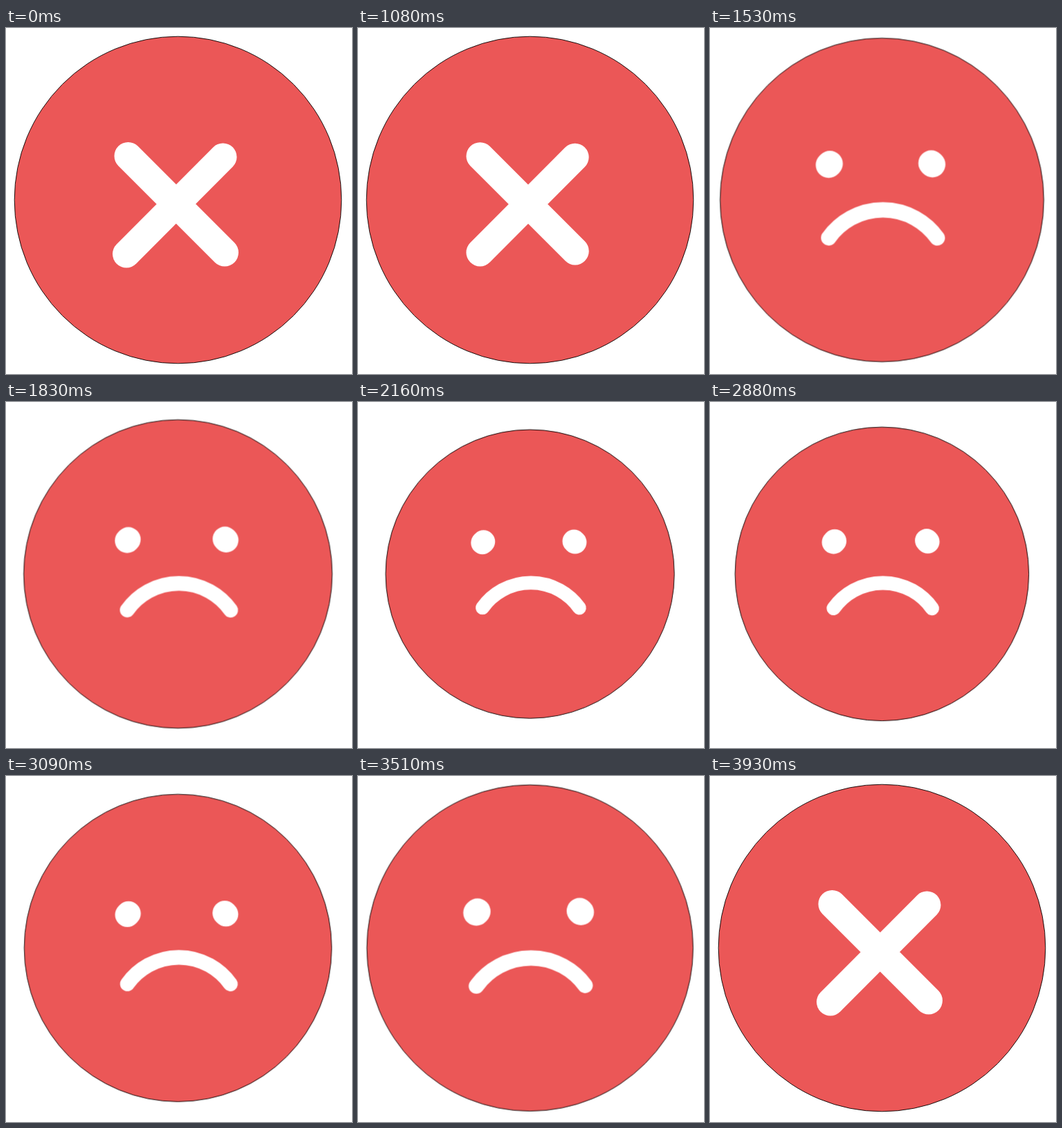
Write an HTML page without scripts that moves like this. It is 500 by 500 pixels and loops after 4890 ms.

```html
<!DOCTYPE html>
<html lang="en">
<head>
<meta charset="utf-8">
<title>Cross to sad face</title>
<style>
  html, body { margin: 0; width: 100%; height: 100%; overflow: hidden; background: #fff; }
  svg { display: block; width: 100vw; height: 100vh; }

  .badge, .arm, .mouth { animation: 4890ms ease-in-out infinite; }
  .badge { transform-origin: 248.5px 248.5px; animation-name: breathe; }
  .disc { fill: #eb5757; stroke: #000; stroke-width: .9; vector-effect: non-scaling-stroke; }
  .arm, .mouth { fill: none; stroke: #fff; stroke-linecap: round; }
  .arm { stroke-width: 40; }
  .left { animation-name: left; }
  .right { animation-name: right; }
  .mouth { animation-name: mouth; }

  @keyframes breathe {
    0%, 26.75%, 74.03%, 100% { transform: scale(1); }
    50.61% { transform: scale(.862); }
  }

  /* each arm of the cross pulls back into a slightly oval eye */
  @keyframes left {
    0%, 21.37%, 80.37%, 100% { d: path("M176.5 185L316 324.5"); stroke-width: 40; }
    29.55%, 72.19% { d: path("M170.7 197.4L172.5 195.6"); stroke-width: 37.8; }
  }
  @keyframes right {
    0%, 21.37%, 80.37%, 100% { d: path("M313.5 186.5L174 326.5"); stroke-width: 40; }
    29.55%, 72.19% { d: path("M320.5 194.8L322.3 196.6"); stroke-width: 37.8; }
  }

  /* the mouth grows outwards from its middle */
  @keyframes mouth {
    0%, 23.52%, 78.22%, 100% { stroke-dasharray: 0 50 0 50; stroke-width: 0; }
    30.47%, 71.17% { stroke-dasharray: 0 0 100 0; stroke-width: 22.6; }
  }
</style>
</head>
<body>
<svg viewBox="0 0 500 500">
  <g class="badge">
    <circle class="disc" cx="248.5" cy="248.5" r="236.3"/>
    <path class="arm left" d="M176.5 185L316 324.5"/>
    <path class="arm right" d="M313.5 186.5L174 326.5"/>
    <path class="mouth" pathLength="100" d="M170.8 303.7A97.2 97.2 0 0 1 329.2 303.9"/>
  </g>
</svg>
</body>
</html>
```
